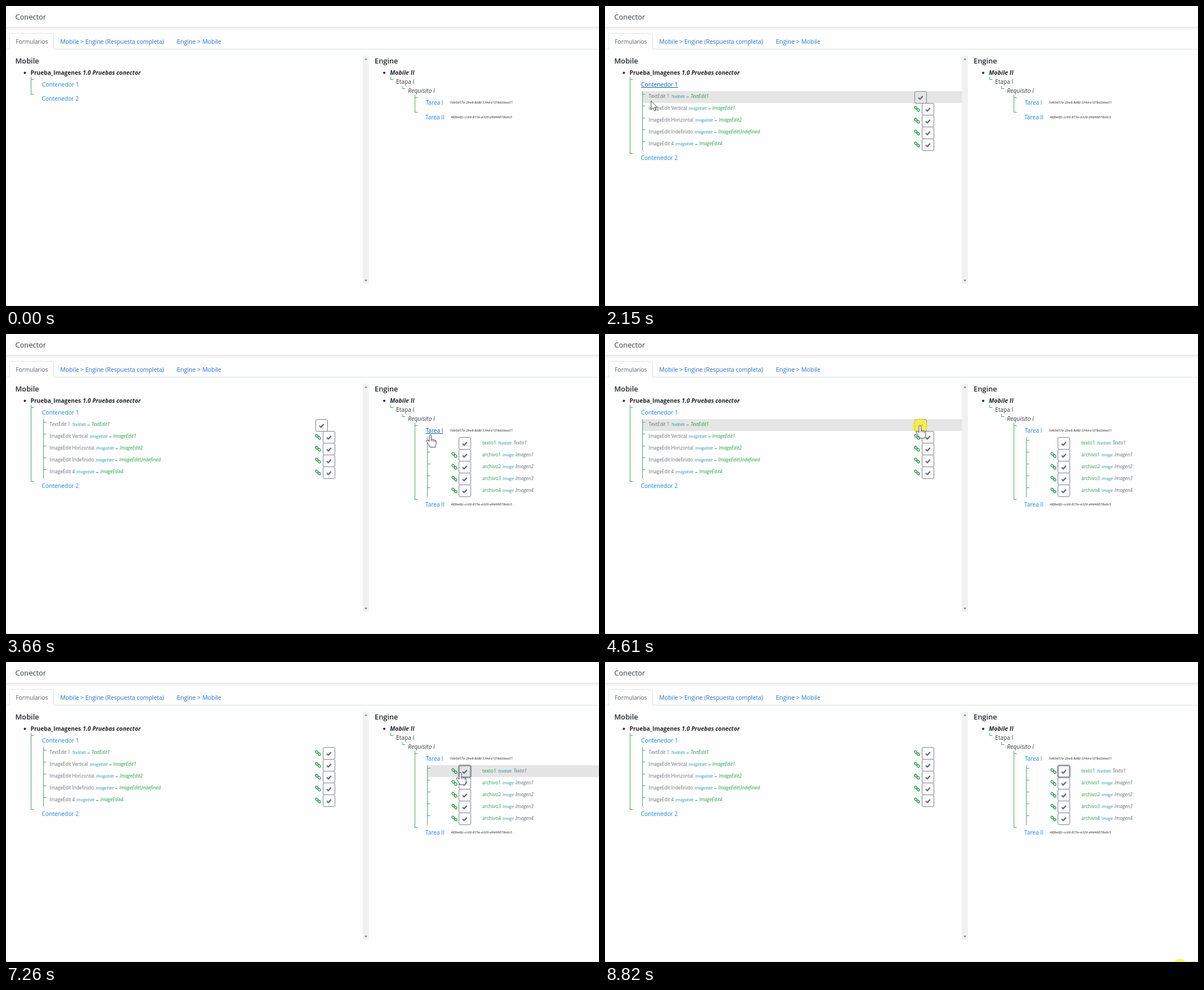
Write an HTML page with a canvas that moves like this. It is 1052x532 px and loops after 8.88 s.

```html
<!DOCTYPE html>
<html lang="es">
<head>
<meta charset="utf-8">
<title>Conector</title>
<style>
html, body { margin: 0; width: 100%; height: 100%; overflow: hidden; background: #fefefe; }
canvas { display: block; }
</style>
</head>
<body>
<canvas id="stage" width="1052" height="532"></canvas>
<script>
const ctx = document.getElementById('stage').getContext('2d');
const LOOP = 8880, STEP = 70, ROW = 21;
const FONT = '"Open Sans", "Noto Sans", sans-serif';
const GREEN = '#2a9d48', TEAL = '#2595aa', GRAY = '#686f76', INK = '#23282d';
const LINK = '#1c84ea', LINK_ON = '#0a5cb5', TAB = '#2270d6', TREE = '#3fae5c';

const HAND = new Path2D('M-2 1.6a1.9 1.9 0 0 1 3.8 0V8.2q2-.9 3.2.6 2-.7 2.9.8 2.3-.3 2.1 2v4q0 2-1.2 4v2.2H-1.2v-2q-2.4-2.6-3.6-5.2l-2-3.4q-.6-2 1.4-2 1.6.3 3.4 2.6z');
const KNUCKLES = new Path2D('M1.8 8v3.4M5 9v2.8M7.9 10v2.4');
const ARROW = new Path2D('M0 0V15.5L3.6 12.2 6 18 8.6 16.9 6.2 11.3H11z');

// Moments when the page changes.
const OPEN_LEFT = 1820, OPEN_RIGHT = 3250, PICK = 4680, JOIN = 5980;
const CLICKS = [OPEN_LEFT, OPEN_RIGHT, PICK, JOIN, 8820, LOOP].map(t => t - STEP);

// Each move starts where the last one ended; bend holds the curve handles.
const HOME = [985, 533];
const MOVES = [
  { from: 780, to: 1550, end: [82, 139] },
  { from: 2010, to: 2910, end: [753, 179], bend: [[40, 380], [1000, 580]] },
  { from: 3660, to: 4480, end: [559, 163] },
  { from: 5010, to: 5840, end: [813, 190] },
  { from: 6910, to: 7260, end: [806, 196] },
  { from: 7330, to: 7740, end: [386, 120], bend: [[740, 225], [500, 150]] },
  { from: 7810, to: 8090, end: [1020, 540], bend: [[500, 250], [700, 560]] }
];

const FIELDS = [
  ['TextEdit 1', 'TextEdit', 'TextEdit1'],
  ['ImageEdit Vertical', 'ImageEdit', 'ImageEdit1'],
  ['ImageEdit Horizontal', 'ImageEdit', 'ImageEdit2'],
  ['ImageEdit Indefinido', 'ImageEdit', 'ImageEditUndefined'],
  ['ImageEdit 4', 'ImageEdit', 'ImageEdit4']
];

const ease = u => u < 0.5 ? 4 * u ** 3 : 1 - 4 * (1 - u) ** 3;

function bezier(a, b, c, d, s) {
  const r = 1 - s;
  return [0, 1].map(i => r ** 3 * a[i] + 3 * r * r * s * b[i] + 3 * r * s * s * c[i] + s ** 3 * d[i]);
}

function pointer(t) {
  let start = HOME, pos = HOME;
  for (const { from, to, end, bend = [start, end] } of MOVES) {
    if (t < from) break;
    const steps = Math.floor((t - from) / STEP + 0.1) + 1;
    const u = Math.min(1, steps * STEP / (to - from + STEP));
    pos = bezier(start, ...bend, end, ease(u));
    start = end;
  }
  return pos;
}

function rect(x, y, w, h, color) {
  ctx.fillStyle = color;
  ctx.fillRect(x, y, w, h);
}

function disc(x, y, r, color) {
  ctx.fillStyle = color;
  ctx.beginPath();
  ctx.arc(x, y, r, 0, 7);
  ctx.fill();
}

// y is the middle of the capitals; returns the right end.
function text(s, x, y, size, color, style = '', underline = false) {
  ctx.font = `${style} ${size}px ${FONT}`;
  ctx.fillStyle = color;
  ctx.fillText(s, x, Math.round(y + size * 0.36));
  const w = ctx.measureText(s).width;
  if (underline) ctx.fillRect(x, Math.round(y + 4.6), w, 1);
  return x + w;
}

// Vertical tree line with ticks to the right.
function branch(x, top, bottom, ticks) {
  rect(x, top, 1, bottom - top + 1, TREE);
  ticks.forEach(y => rect(x, y, 5.5, 1, TREE));
}

function triangle(x, y, dir) {
  ctx.fillStyle = '#777';
  ctx.beginPath();
  ctx.moveTo(x - 2.5, y + dir * 1.5);
  ctx.lineTo(x + 2.5, y + dir * 1.5);
  ctx.lineTo(x, y - dir * 1.5);
  ctx.fill();
}

function check(x, y, color) {
  ctx.strokeStyle = color;
  ctx.lineWidth = 2.3;
  ctx.beginPath();
  ctx.moveTo(x - 4, y);
  ctx.lineTo(x - 1.3, y + 2.6);
  ctx.lineTo(x + 3.8, y - 2.6);
  ctx.stroke();
}

function button(x, y, { filled = false, ring = false } = {}) {
  ctx.beginPath();
  ctx.roundRect(x - 10.5, y - 10.5, 21, 21, 2.5);
  if (ring) {
    ctx.strokeStyle = 'rgba(108,117,125,.5)';
    ctx.lineWidth = 3.5;
    ctx.stroke();
  }
  if (filled) {
    ctx.fillStyle = GRAY;
    ctx.fill();
  }
  ctx.strokeStyle = '#7b838a';
  ctx.lineWidth = 1;
  ctx.stroke();
  check(x, y + 0.5, filled ? '#fff' : '#666e75');
}

function chain(x, y) {
  ctx.strokeStyle = GREEN;
  ctx.lineWidth = 1.5;
  for (const d of [-1, 1]) {
    ctx.beginPath();
    ctx.ellipse(x + d * 2.2, y + d * 1.9, 2.6, 1.9, Math.PI / 4, 0, 7);
    ctx.stroke();
  }
}

function drawFrame() {
  rect(0, 0, 1052, 532, '#fefefe');
  rect(0, 37, 1052, 1, '#dfe1e3');
  const shade = ctx.createLinearGradient(0, 38, 0, 45);
  shade.addColorStop(0, 'rgba(0,0,0,.055)');
  shade.addColorStop(1, 'rgba(0,0,0,0)');
  rect(0, 38, 1052, 7, shade);
  text('Conector', 16.5, 19, 12.8, '#343a40');

  rect(0, 76, 1052, 1, '#dee2e6');
  ctx.fillStyle = '#fefefe';
  ctx.strokeStyle = '#dee2e6';
  ctx.lineWidth = 1;
  ctx.beginPath();
  ctx.roundRect(6.5, 48.5, 78, 28, [3, 3, 0, 0]);
  ctx.fill();
  ctx.stroke();
  rect(7, 76, 77, 1, '#fefefe');
  text('Formularios', 17.3, 63, 10.15, '#5a6268');
  text('Mobile > Engine (Respuesta completa)', 96.3, 63, 10.4, TAB);
  text('Engine > Mobile', 303.3, 63, 10.6, TAB);

  rect(633, 88, 11, 405, '#f1f1f1');
  triangle(638.5, 94, 1);
  triangle(638.5, 487, -1);
  rect(0, 531, 1052, 1, '#e3e5e7');

  text('Mobile', 16.5, 97, 12.8, INK, '600');
  text('Engine', 654, 97, 12.8, INK, '600');
  disc(33.5, 118.5, 2, INK);
  disc(671, 118.5, 2, INK);
  text('Prueba_Imagenes', 43.5, 118, 10.2, INK, 'bold');
  text('1.0 Pruebas conector', 136, 118, 10.45, INK, 'italic bold');
  text('Mobile II', 681, 118, 10.6, INK, 'italic bold');
  text('Etapa I', 692, 134, 10.2, '#3a3f44');
  text('Requisito I', 713, 150.5, 10.5, '#3a3f44', 'italic');
  branch(682, 126, 130, [130]);
  branch(703, 142, 146, [146]);
}

// Grey band on the row under the pointer, and the tree line beside the rows.
function drawRows(x, right, top, [px, py]) {
  const row = px > x && px < right ? Math.floor((py - top) / ROW) : -1;
  if (FIELDS[row]) rect(x + 1, top + row * ROW, right - x - 1, ROW, '#e5e5e5');
  branch(x, top, top + 5 * ROW, FIELDS.map((_, i) => top + 5 + i * ROW));
}

function drawLeft(t, pos) {
  const open = t >= OPEN_LEFT, end = open ? 261 : 156;
  const focus = t >= 1480 && t < OPEN_RIGHT - STEP;
  branch(44, 126, end, [130, end]);
  text('Contenedor 1', 64, 139, 10.25, focus ? LINK_ON : LINK, '', focus);
  text('Contenedor 2', 63.5, end + 8, 10.25, LINK);
  if (!open) return;

  drawRows(66, 633, 151, pos);
  FIELDS.forEach(([label, type, name], i) => {
    const y = 160.5 + i * ROW, linked = i > 0 || t >= PICK;
    let x = text(label, 77.5, y, 8.15, GRAY);
    x = text(type, x + 3, y, 7.3, TEAL, 'italic');
    rect(x + 3, Math.round(y), 4, 1, '#3c8f55');
    text(name, x + 10, y, 8.3, GREEN, 'italic');
    if (linked) chain(553.5, y + 1);
    button(linked ? 573 : 560, y + 1.5, { filled: i === 0 && t >= PICK && t < JOIN });
  });
}

function drawRight(t, pos) {
  const open = t >= OPEN_RIGHT, end = open ? 293 : 188;
  const focus = t >= 2840 && t < PICK - STEP;
  branch(725, 158, end, [162, end]);
  text('Tarea I', 744.5, 171.5, 10.15, focus ? LINK_ON : LINK, '', focus);
  text('7d60d57b-2be8-8d8f-334d-e1f78d2daa31', 787, 171, 6.05, INK, 'italic');
  text('Tarea II', 744, end + 9, 10.1, LINK);
  text('48fbe6fc-cc66-873e-a329-d4d46078a6c5', 789, end + 9, 6.05, INK, 'italic');
  if (!open) return;

  drawRows(747, 1052, 183, pos);
  FIELDS.forEach(([, type], i) => {
    const y = 193 + i * ROW;
    let x = text(i ? 'archivo' + i : 'texto1', 845, y, 8.35, GREEN);
    x = text(type.replace('ImageEdit', 'Image'), x + 3, y, 7.3, TEAL, 'italic');
    text(i ? 'Imagen' + i : 'Texto1', x + 3, y, 8.4, GRAY, 'italic');
    if (i > 0 || t >= JOIN) chain(795.5, y + 0.5);
    button(814, y + 1, { ring: i === 0 && t >= JOIN - STEP });
  });
}

function overLink(t, x, y) {
  const inside = (l, top, r, b) => x >= l && x <= r && y >= top && y <= b;
  return inside(63, 133, 130, 146) || inside(744, 165, 777, 182) ||
    (t >= OPEN_LEFT && inside(549, 151, 583, 256)) ||
    (t >= OPEN_RIGHT && inside(804, 183, 825, 288));
}

function drawPointer(t, [x, y]) {
  if (CLICKS.some(c => t >= c && t < c + STEP)) disc(x, y, 13.5, 'rgba(250,240,30,.7)');
  const hand = overLink(t, x, y), shape = hand ? HAND : ARROW;
  ctx.save();
  ctx.translate(x, y);
  ctx.lineJoin = 'round';
  ctx.lineWidth = 1;
  ctx.fillStyle = '#fff';
  ctx.strokeStyle = '#40454c';
  ctx.fill(shape);
  ctx.stroke(shape);
  if (hand) ctx.stroke(KNUCKLES);
  ctx.restore();
}

function render(now) {
  const t = now % LOOP, pos = pointer(t);
  drawFrame();
  drawLeft(t, pos);
  drawRight(t, pos);
  drawPointer(t, pos);
}

const start = performance.now();
function tick() {
  render(performance.now() - start);
  requestAnimationFrame(tick);
}
tick();
</script>
</body>
</html>
```
